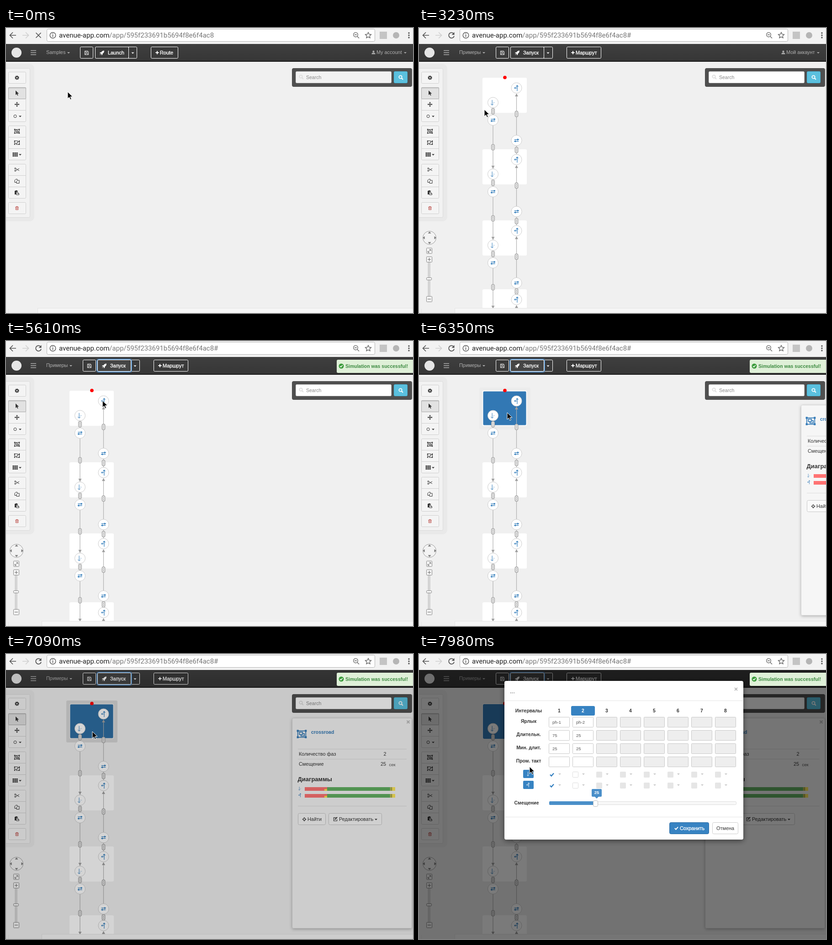
Write an HTML page that moves like this. It is 891 by 625 pixels and loops after 8000 ms.

```html
<!DOCTYPE html>
<html lang="ru">
<head>
<meta charset="utf-8">
<title>Traffic editor</title>
<style>
  html, body { margin: 0; width: 100%; height: 100%; overflow: hidden; background: #f0f0f0; }
  svg { display: block; width: 891px; height: 625px; }
  text { font: 10.9px "Liberation Sans", Arial, sans-serif; fill: #333; white-space: pre; }
  .url { font: 15px Roboto, sans-serif; fill: #777; }
  .bold { font-weight: bold; font-size: 10.4px; }
  .nav { fill: #fff; stroke: #fff; stroke-width: .35px; }
  .dim { fill: #b0b0b0; }
  .mid { text-anchor: middle; }
  .small { font-size: 9.5px; fill: #555; }
</style>
</head>
<body>
<svg id="stage" viewBox="0 0 891 625"></svg>
<script>
const BLUE = '#337ab7', NONE = 'none';

const rect = (x, y, w, h, fill, stroke = NONE, rx = 0, more = '') => {
  const d = stroke === NONE ? 0 : .5;
  return `<rect x="${x + d}" y="${y + d}" width="${w - 2 * d}" height="${h - 2 * d}" rx="${rx}" fill="${fill}" stroke="${stroke}" ${more}/>`;
};
const line = (d, stroke, w = 1, more = '') => `<path d="${d}" fill="none" stroke="${stroke}" stroke-width="${w}" ${more}/>`;
const shape = (d, fill) => `<path d="${d}" fill="${fill}"/>`;
const circle = (x, y, r, fill, stroke = NONE, w = 1) => `<circle cx="${x}" cy="${y}" r="${r}" fill="${fill}" stroke="${stroke}" stroke-width="${w}"/>`;
const text = (x, y, s, cls = '', more = '') => `<text x="${x}" y="${y}" class="${cls}" ${more}>${s}</text>`;
const group = (id, body, more = '') => `<g id="${id}" ${more}>${body}</g>`;
const caret = (x, y, fill = '#333') => shape(`M${x - 3} ${y - 1.5}h6l-3 3z`, fill);
const repeat = (n, fn) => Array.from({ length: n }, (_, i) => fn(i)).join('');

// Icons are centred on the origin and take the current colour.
const C = 'currentColor';
const corners = (w, h) => [[-w, -h], [w, -h], [-w, h], [w, h]].map(([x, y]) => rect(x - 1.2, y - 1.2, 2.4, 2.4, C)).join('');
const icons = {
  gear: circle(0, 0, 2.6, NONE, C, 2) + `<circle r="4" fill="none" stroke="${C}" stroke-width="1.5" stroke-dasharray="1.6 1.54"/>`,
  pointer: shape('M-3-5.5v10l2.4-2.3 1.6 3.6 1.6-.7-1.5-3.5h3z', C),
  move: line('M-4 0h8M0-4v8', C, 1.4) + shape('M0-5.5l2 2.3h-4zM0 5.5l2-2.3h-4zM-5.5 0l2.3 2v-4zM5.5 0l-2.3 2v-4z', C),
  ring: circle(0, 0, 3, NONE, C),
  group: line('M-5-4h10v8h-10zM-3-2.3h4v3h-4zM1-.5h2.2v3h-4.2v-1.5', C) + corners(5, 4),
  ungroup: line('M-5.5-4h7v5h-7zM1.5-2h4v6h-7v-3', C) + corners(5, 3.5),
  grid: repeat(9, i => rect(-5.5 + i % 3 * 4, -4.5 + (i / 3 | 0) * 3.2, 3.2, 2.5, C)),
  cut: line('M-2.5-2l7.5 4.5M-2.5 2l7.5-4.5', C) + circle(-3.7, -2.5, 1.4, NONE, C) + circle(-3.7, 2.5, 1.4, NONE, C),
  copy: line('M-5-1.5l2.5-2.5h3v2.5M-5-1.5v4.5h4M-1 1l2.5-2.5h3.5v6.5h-6z', C),
  paste: shape('M-5-4h2v-1h3v1h2v2h-2l-2 2v4h-3z', C) + line('M-1.2 0h3v2h2.5v2.8h-5.5zM1.8 0l2.5 2', C),
  trash: line('M-4-2.5h8M-1.5-2.5v-1.5h3v1.5M-3-2.5v6.5h6v-6.5M-1-1v3.5M1-1v3.5', C),
  save: line('M-4.5-4.5h7.5l1.5 1.5v7.5h-9zM-2.5-4.5v3h4.5v-3M-2.5 4.5v-3.5h5v3.5', C),
  rocket: shape('M5.5-5.5q-5 0-7 4l-3 .5-1 2 2.5.2 2 2 .2 2.5 2-1 .5-3q4-2 3.8-7.2zM-3.5 2.5l-2 3 3-2z', C),
  plus: line('M-4 0h8M0-4v8', C, 2.2),
  user: circle(0, -2, 2.4, C) + shape('M-4.5 4.5v-2q1-2 4.5-2t4.5 2v2z', C),
  search: circle(-1, -1, 3.2, NONE, C, 1.7) + line('M1.5 1.5l3 3', C, 2),
  check: line('M-4 0l2.8 3 5.2-6', C, 2.2),
  edit: line('M2-3.5h-6v8h8v-4', C, 1.2) + line('M-1.5 1.5l6-6', C, 2),
  target: circle(0, 0, 3, NONE, C, 1.2) + line('M-5 0h3.5M1.5 0h3.5M0-5v3.5M0 1.5v3.5', C, 1.2),
  down: line('M-2-6v12m-3-3l3 3 3-3', C) + line('M0 0h5', C, 1, 'stroke-dasharray="1.5 1" opacity=".6"'),
  up: line('M1.5 7v-13m-2.5 3l2.5-3 2.5 3M1.5 0h-6m2-2l-2 2 2 2', C, 1.2),
  swap: line('M-5-2h8M5 2h-8', C, 1.5) + shape('M2-4.5l4 2.5-4 2.5zM-2 4.5l-4-2.5 4-2.5z', C)
};
const icon = (name, x, y, color = '#333', s = 1) => `<g transform="translate(${x} ${y}) scale(${s})" color="${color}">${icons[name]}</g>`;

function browser() {
  return rect(0, 0, 891, 35, '#f2f2f2') + rect(89, 2, 719, 28, '#fff', '#b4b4b4', 3) +
    line('M22 16h-13M15 9.5l-6.5 6.5 6.5 6.5', '#555', 1.7) +
    line('M36 16h13M43 9.5l6.5 6.5-6.5 6.5', '#d0d0d0', 1.7) +
    group('stop', line('M65.5 10.5l11 11M76.5 10.5l-11 11', '#555', 1.7)) +
    group('reload', line('M76 12.5a6 6 0 1 0 1 5', '#555', 1.8) + shape('M77.5 9v6h-6z', '#555')) +
    circle(102.5, 16, 6.3, NONE, '#555', 1.4) + line('M102.5 15v4.5M102.5 12v1.7', '#555', 1.6) +
    `<text x="116" y="21" class="url"><tspan fill="#222">avenue-app.com</tspan>/app/595f233691b5694f8e6f4ac8<tspan id="hash">#</tspan></text>` +
    circle(765.5, 14.7, 4.8, NONE, '#666', 1.3) + line('M763 14.7h5M769 18.5l4 4', '#666', 1.4) +
    line('M793 9.5l1.9 4.2 4.6.5-3.4 3.1.9 4.5-4-2.3-4 2.3.9-4.5-3.4-3.1 4.6-.5z', '#555', 1.2) +
    rect(818, 8, 16, 16, '#c4c4c4') + circle(854, 16, 7, '#b5b5b5') +
    [11, 16, 21].map(y => circle(882, y, 1.7, '#555')).join('');
}

function navItems(id, x, labels, accountX, launchId) {
  const [samples, launch, route, account] = labels;
  const routeW = id === 'navRu' ? 76 : 60, launchX = x + (id === 'navRu' ? 32 : 33);
  const outline = (bx, w) => rect(bx, 41, w, 26, '#3a3a3a', '#fff', 2);
  return group(id,
    text(88, 57, samples, 'dim') + caret(id === 'navRu' ? 142 : 137, 54.5, '#b0b0b0') +
    outline(x, 29) + icon('save', x + 14.5, 54.5, '#fff', .9) +
    outline(launchX, id === 'navRu' ? 93 : 92) + group(launchId, outline(launchX, 74)) +
    icon('rocket', launchX + 15, 54.5, '#fff', .9) + text(launchX + 28, 58, launch, 'nav') +
    line(`M${launchX + 73.5} 41v26`, '#fff') + caret(launchX + 82.5, 55, '#fff') +
    outline(x + 155, routeW) + icon('plus', x + 169, 54, '#fff', .9) + text(x + 175, 58, route, 'nav') +
    icon('user', accountX, 53.5, '#aaa', .9) + text(accountX + 6.5, 57, account, 'dim') + caret(874, 54.5, '#aaa'));
}

function toolbar() {
  const groups = [[96, 1], [130, 3], [214, 3], [298, 3], [382, 1]];
  const boxes = groups.map(([y, n]) => rect(5, y, 39, n * 25 + 1, '#f4f4f4', '#cfcfcf', 2) +
    repeat(n - 1, i => line(`M5 ${y + 25.5 + 25 * i}h39`, '#cfcfcf'))).join('');
  const glyphs = [['gear', 109], ['pointer', 142.5], ['move', 167.5], ['ring', 193.5], ['group', 226.5],
    ['ungroup', 251.5], ['grid', 277.5], ['cut', 310.5], ['copy', 335.5], ['paste', 361]];
  return rect(-12, 79, 74, 345, '#e9e9e9', NONE, 10) + rect(-5, 88, 58, 328, '#f2f2f2', '#dadada', 3) + boxes +
    rect(5, 130, 39, 26, '#e2e2e2', '#a8a8a8', 1) + rect(6, 131, 37, 2, '#d0d0d0') +
    glyphs.map(([n, y]) => icon(n, n === 'ring' || n === 'grid' ? 20 : 24, y)).join('') +
    caret(31, 194) + caret(31, 278) + icon('trash', 24, 395, '#b9443f', .9);
}

function zoomer() {
  const box = (x, y, s) => rect(x, y, s, s, '#f4f4f4', '#8a8a8a', 1);
  return circle(23, 460, 14.5, '#f3f3f3', '#999') +
    shape('M23 446.5l3.5 4h-7zM23 473.5l3.5-4h-7zM8.5 460l4-3.5v7zM37.5 460l-4-3.5v7z', '#777') +
    box(16, 482, 13) + line('M19.5 492l6-6M19.5 489v3.3h3.3M22.5 485.7h3.3v3.3', '#666') +
    rect(20, 513, 4, 76, '#f8f8f8', '#999') + box(16, 501, 13) + line('M19 507.5h7M22.5 504v7', '#666') +
    rect(16, 547, 12, 6, '#f4f4f4', '#888', 1) + box(16, 588, 13) + line('M19 594.5h7', '#666');
}

function menu() {
  const rows = ['Конфликтная точка', 'Перекресток + перегон', '4 перекрестка в линию', 'Лумянское шоссе утро (212)'];
  return rect(77, 35, 79, 38, '#060606') + text(88, 57, 'Примеры', 'nav') + caret(142, 54.5, '#fff') +
    rect(77, 74, 171, 142, '#fff', '#c8c8c8', 2, 'filter="url(#shadow)"') +
    group('hover', rect(78, 0, 169, 35, '#f5f5f5')) +
    rows.map((s, i) => text(93, 95 + 35.4 * i, s) + (i ? line(`M78 ${73.5 + Math.round(35.4 * i)}h169`, '#e2e2e2') : '')).join('');
}

function network() {
  const L = 162, R = 213.5, tops = [109, 266, 422, 573];
  const node = (x, y, name) => circle(x, y, 11.5, '#fff', '#ccc') + icon(name, x, y, '#2b78b8', .95);
  const light = (x, y) => rect(x - 4, y - 7, 8, 14, '#f4f4f4', '#999', 3) +
    [-3.8, 0, 3.8].map(d => circle(x, y + d, 1.7, '#fff', '#999', .8)).join('');
  const boxes = tops.map(y => rect(139, y, 97, 77, '#fff', NONE, 3)).join('');
  const selected = group('picked', rect(140, 110, 96, 76, BLUE, NONE, 3)) +
    group('edge', rect(139, 109, 97, 77, NONE, '#fff', 3, 'stroke-width="2"')) +
    group('halo', rect(132, 102, 112, 92, '#000', NONE, 3));
  const parts = tops.map((y, i) => {
    const next = tops[i + 1], last = next === undefined;
    const links = last ? '' :
      line(`M${L} ${y + 60}V${next + 43}M${R} ${y + 37}V${next + 20}`, '#b0b0b0', 1.2) +
      light(L, y + 73.5) + light(L, next - 4.5) + light(R, y + 79.5) + light(R, next + 1.5 + (i === 2 ? 3 : 0)) +
      shape(`M${L - 3.5} ${next + 36}h7l-3.5 6.5z`, '#a0a0a0') +
      node(L, y + 93, 'swap') + node(R, next - (i === 2 ? 14 : 19.5), 'swap');
    return links + shape(`M${R - 3.5} ${y + 41}h7l-3.5-6.5z`, '#a0a0a0') +
      node(R, y + 22.5, 'up') + node(L, y + 54.5, 'down');
  }).join('');
  return boxes + selected + parts + circle(188, 108.5, 3.8, '#f00');
}

function sidePanel() {
  const bar = y => rect(654, y, 198, 8, '#62b162') + rect(654, y, 49, 8, '#ff7373') + rect(697, y + 4, 6, 4, '#ffe34d') +
    rect(841, y, 11, 8, '#ffe95c') + line(`M842.5 ${y}v8M844.5 ${y}v8`, '#6a7a40');
  const button = (x, w) => rect(x, 349, w, 26, '#fafafa', '#c8c8c8', 3);
  return rect(626, 140, 263, 462, '#f6f6f6', '#d4d4d4', 3, 'filter="url(#shadow)"') +
    line('M877.5 146l6 6M883.5 146l-6 6', '#bbb', 2) +
    icon('group', 647.5, 175.5, BLUE, 1.75) + text(668, 175, 'crossroad', 'bold', `style="fill:${BLUE}"`) +
    line('M639 208.5h238M639 230.5h238M639 333.5h238', '#ddd') +
    text(641, 223, 'Количество фаз') + text(826.5, 223, '2') + text(641, 245, 'Смещение') + text(820, 245, '25') +
    text(838.5, 246, 'сек', 'small') + text(638.5, 279, 'Диаграммы', 'bold', 'style="font-size:13px"') +
    icon('down', 643.5, 295, BLUE, .65) + icon('up', 643.5, 309.5, BLUE, .65) + bar(292) + bar(307) +
    button(639, 61) + icon('target', 653, 362.5, '#333', .9) + text(660, 366, 'Найти') +
    button(706, 117) + icon('edit', 721, 362, '#333', .9) + text(729, 366, 'Редактировать') + caret(810, 363);
}

function modal() {
  const labels = ['Ярлык', 'Длительн.', 'Мин. длит.', 'Пром. такт'];
  const values = [['ph-1', 'ph-2'], ['75', '25'], ['25', '25'], ['', '']];
  const column = i => {
    const x = 284 + 52 * i, off = i > 1;
    return text(x + 23, 128, i + 1, 'bold mid', i === 1 ? 'style="fill:#fff"' : '') +
      values.map((row, r) => rect(x, 138 + 29 * r, 46, 23, off ? '#eee' : '#fff', '#c8c8c8', 1) +
        text(x + 8, 153 + 29 * r, row[i] || '', 'small')).join('') +
      [258, 282].map(y => (i ? rect(x, y, 13, 13, off ? '#e6e6e6' : '#fff', off ? '#e6e6e6' : '#ddd', 1) :
        icon('check', x + 7, y + 6.5, '#2f7dbf')) + caret(x + 24, y + 5.5, '#c4c4c4')).join('');
  };
  return rect(187, 59, 523, 348, '#fff', NONE, 4, 'filter="url(#deep)"') +
    text(199, 86, '...', '', 'style="font-size:13px"') + line('M691 74l6 6M697 74l-6 6', '#bbb', 1.8) +
    line('M188 102.5h521M188 357.5h521', '#e5e5e5') + rect(333, 114, 52, 21, '#3783c2', NONE, 3) +
    text(240, 128, 'Интервалы', 'bold mid') +
    labels.map((s, i) => text(240, 151 + 29 * i, s, 'bold mid')).join('') + repeat(8, column) +
    rect(228, 254, 23, 18, '#3783c2', NONE, 2) + icon('down', 240, 263, '#fff', .75) +
    rect(228, 278, 23, 18, '#3783c2', NONE, 2) + icon('up', 239, 287, '#fff', .75) +
    text(235.5, 330, 'Смещение', 'bold mid') +
    rect(285, 323, 410, 8, '#f8f8f8', '#ddd', 2) + rect(285, 323, 101, 8, '#4a8fc9', NONE, 2) +
    rect(381, 321, 11, 14, '#fff', '#bbb', 3) +
    group('tip', rect(378, 296, 22, 17, '#4a8fc9', NONE, 2) + shape('M385 313h8l-4 4z', '#4a8fc9') +
      text(389, 307, '25', 'bold mid', 'style="fill:#fff;font-size:9.5px"')) +
    rect(548, 369, 87, 26, '#3783c2', '#2e6da4', 3) + icon('check', 563.5, 382, '#fff', .9) + text(571, 386, 'Сохранить', 'nav') +
    rect(642, 369, 57, 26, '#fff', '#ccc', 3) + text(670.5, 386, 'Отмена', 'mid');
}

const blur = (id, dy, sd, a) => `<filter id="${id}" x="-20%" y="-20%" width="140%" height="140%"><feDropShadow dx="0" dy="${dy}" stdDeviation="${sd}" flood-opacity="${a}"/></filter>`;

stage.innerHTML =
  `<defs>${blur('shadow', 2, 3, .25)}${blur('deep', 3, 6, .5)}
    <linearGradient id="bar" x2="0" y2="1"><stop stop-color="#3f3f3f"/><stop offset="1" stop-color="#363636"/></linearGradient>
    <clipPath id="view"><path d="M0 35h891v590H0z"/></clipPath><clipPath id="canvas"><path d="M0 74h891v540H0z"/></clipPath></defs>` +
  rect(0, 0, 891, 625, '#f0f0f0') +
  group('page',
    group('network', network(), 'clip-path="url(#canvas)"') +
    group('footer', rect(0, 614, 891, 20, '#f6f6f6', '#e4e4e4')) + line('M5.5 616v9', '#e6e6e6') +
    toolbar() + group('zoomer', zoomer()) +
    rect(626, 88, 263, 41, '#4f4f4f', NONE, 4) +
    rect(634, 95, 210, 26, '#f2f2f2', '#ccc', 2, 'id="field"') + icon('search', 646.5, 107.5, '#ddd') +
    text(657, 112, 'Search', '', 'style="fill:#888;font-size:10.5px"') +
    rect(849, 95, 30, 26, '#5bc0de', '#46b8da', 2) + icon('search', 864.5, 108.5, '#fff') +
    group('side', sidePanel()) +
    rect(0, 35, 891, 39, 'url(#bar)') + rect(0, 72.5, 891, 1.5, '#0c0c0c') +
    circle(23, 54, 11, '#e6e6e6') + line('M54 49.5h12M54 54h12M54 58.5h12', '#b0b0b0', 1.4) +
    navItems('navEn', 162, ['Samples', 'Launch', 'Route', 'My account'], 804.5, 'launchEn') +
    navItems('navRu', 168, ['Примеры', 'Запуск', 'Маршрут', 'Мой аккаунт'], 797.5, 'launchRu') +
    group('focus', rect(198, 39, 78, 30, NONE, '#3e79b5', 3) + rect(199, 40, 76, 28, NONE, '#6fa8dc', 3)) +
    group('menu', menu()) +
    group('shade', rect(0, 35, 891, 590, '#000')) +
    group('modal', modal()) +
    group('alert', rect(724, 41, 190, 29, '#dff0d8', NONE, 3) + circle(734, 55, 5.5, '#3a9b3a') + icon('check', 734, 55, '#fff', .7) +
      text(743, 59, 'Simulation was successful!', 'bold', 'style="fill:#3c8a40;font-size:10.5px"')),
    'clip-path="url(#view)"') +
  browser() +
  group('arrow', `<path d="M0 0v15l3.5-3.3 2.4 5.5 2.4-1-2.3-5.4h5z" stroke="#fff"/>`) +
  group('hand', `<path d="M-1.5 1.5a1.5 1.5 0 0 1 3 0v4.5l1-.8 1.6.4.6.8 1.6.2.6.9 1.4.4.4 1.2v3.5l-1.5 3.5v2h-7v-1.8l-4-5.5c-.8-1.5.6-2.5 2-1.3l1.3 1.3z" fill="#fff" stroke="#000"/>`);

const LOOP = 8000;
const stamps = [0, ...[[150, 1160, 8], [1310, 2350, 8], [2490, 3530, 8], [3680, 4560, 7], [4710, 4710, 1],
  [4860, 5760, 7], [5910, 6650, 6], [6800, 6800, 1], [6940, 7980, 8]]
  .flatMap(([a, b, n]) => Array.from({ length: n }, (_, i) => Math.floor((a + (b - a) * i / Math.max(1, n - 1)) / 10) * 10))];

// Keys are [step, ...values], linear in between.
function track(keys, n) {
  const i = keys.findIndex(k => k[0] > n);
  if (i < 0) return keys[keys.length - 1].slice(1);
  if (i === 0) return keys[0].slice(1);
  const [a, b] = [keys[i - 1], keys[i]], p = (n - a[0]) / (b[0] - a[0]);
  return a.slice(1).map((v, j) => v + (b[j + 1] - v) * p);
}
const cursorPath = [[0, 135, 140], [1, 134, 132], [4, 118, 62], [5, 117, 57], [7, 116, 72], [8, 115, 90], [11, 116, 118],
  [14, 116, 148], [16, 118, 154], [19, 119, 156], [24, 159, 194], [29, 237, 68], [31, 240, 54], [34, 240, 54],
  [39, 204, 150], [43, 193, 157], [45, 189, 170], [50, 189, 170], [54, 242, 247]];

const el = id => document.getElementById(id);
const show = (id, on) => el(id).style.display = on ? '' : 'none';
const fade = (id, v) => { show(id, v > 0); el(id).style.opacity = v; };
const move = (id, x, y = 0) => el(id).setAttribute('transform', `translate(${x} ${y})`);
const within = (n, a, b) => n >= a && n < b;

function draw(n) {
  const ready = n >= 2;
  show('stop', !ready); show('reload', ready);
  show('navEn', !ready); show('navRu', ready); show('zoomer', ready);
  el('field').setAttribute('fill', ready ? '#fff' : '#f2f2f2');
  move('footer', ready ? 78 : 69);

  show('menu', within(n, 6, 18));
  move('hover', 0, n < 10 ? 74 : n < 15 ? 109 : 145);
  show('hash', n >= 18);
  show('network', n >= 19);
  el('launchRu').firstChild.setAttribute('fill', within(n, 30, 36) ? '#222' : n >= 36 ? '#454545' : '#3a3a3a');
  show('focus', n >= 33);

  show('alert', n >= 36);
  move('alert', track([[36, 110], [37, 30], [38, 0]], n)[0]);
  show('picked', n >= 42);
  show('edge', within(n, 42, 49));
  fade('halo', within(n, 42, 49) ? track([[43, .015], [47, .1]], n)[0] : 0);
  show('side', n >= 43);
  move('side', track([[43, 210], [44, 50], [45, 0]], n)[0]);

  fade('shade', track([[47, 0], [48, .17], [49, .52]], n)[0]);
  fade('modal', track([[48, 0], [49, .35], [50, 1]], n)[0]);
  move('modal', 0, track([[49, -64], [50, -7], [51, 0]], n)[0]);
  move('tip', track([[49, 11], [50, 0]], n)[0]);

  const pointing = within(n, 4, 19) || within(n, 30, 35);
  show('hand', pointing); show('arrow', !pointing);
  move(pointing ? 'hand' : 'arrow', ...track(cursorPath, n));
}

const start = performance.now();
let shown = -1;
function tick() {
  const t = (performance.now() - start) % LOOP;
  const n = stamps.findLastIndex(s => s <= t);
  if (n !== shown) draw(shown = n);
  requestAnimationFrame(tick);
}
tick();
</script>
</body>
</html>
```
